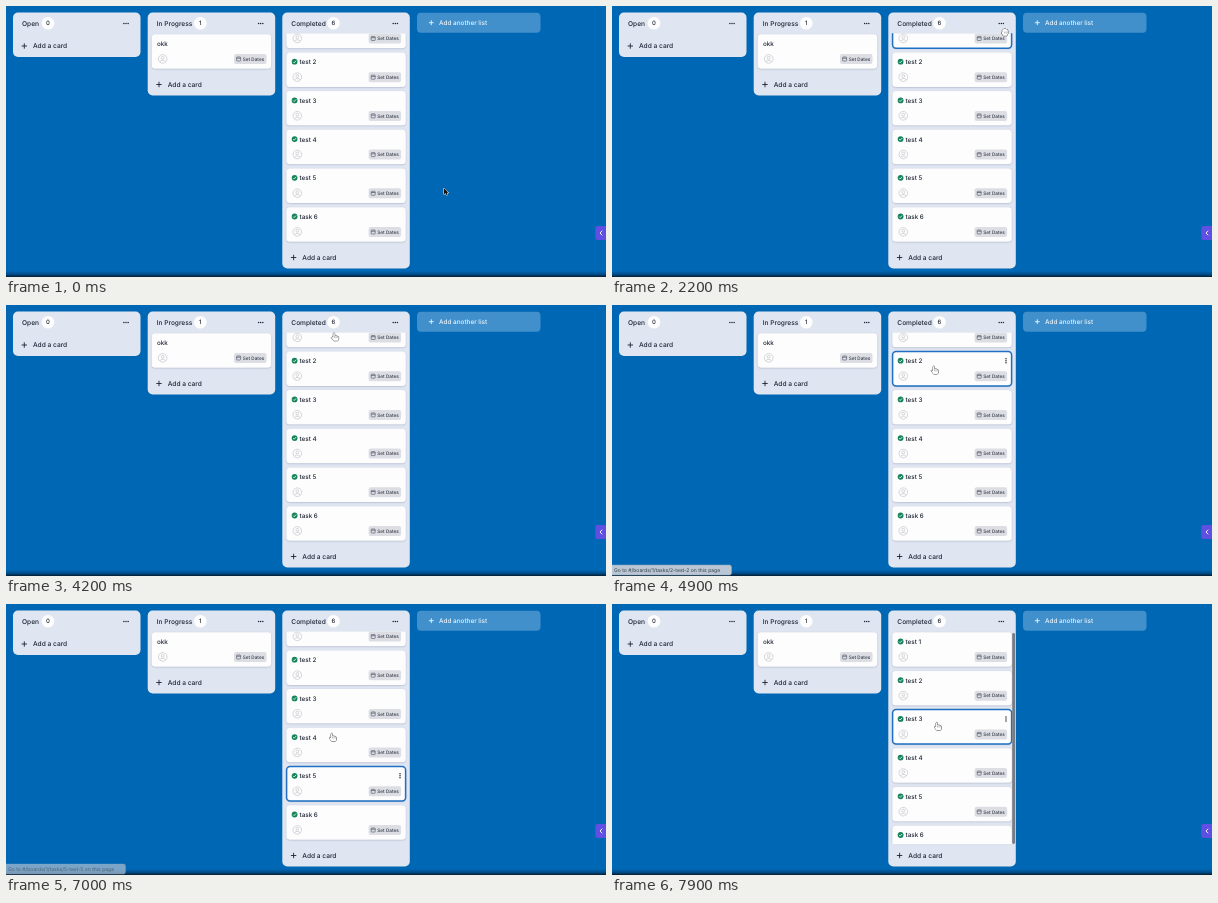
Write an HTML page with a canvas that moves like this. It is 600x271 px and loops after 8 s.

```html
<!DOCTYPE html>
<html>
<head>
<meta charset="utf-8">
<style>
  html, body { margin: 0; height: 100%; overflow: hidden; background: #0067b4; }
  canvas { display: block; width: 600px; height: 271px; }
</style>
</head>
<body>
<canvas></canvas>
<script>
const canvas = document.querySelector('canvas');
const ctx = canvas.getContext('2d');
const scale = window.devicePixelRatio || 1;
canvas.width = 600 * scale;
canvas.height = 271 * scale;

const LOOP = 8000, LAG = 200, MAX_SCROLL = 20.5;
const INK = '#1d2433', LIST = '#dfe5f1', WHITE = '#fdfdfd', ACCENT = '#1f70c4';
const tasks = ['test 1', 'test 2', 'test 3', 'test 4', 'test 5', 'task 6'];

// Pointer stops: time, x, y
const stops = [
  [0, 438, 182], [500, 438, 182], [1600, 402, 62], [2200, 393, 26], [2500, 389, 18],
  [3050, 389, 18], [3200, 340, 17], [3800, 333, 20], [4000, 331, 22], [4650, 323, 64],
  [5000, 323, 65], [5750, 330, 123], [5850, 330, 123], [6500, 328, 180], [6820, 328, 177],
  [7000, 327, 133], [7500, 326, 122], [8000, 326, 122]
];

const clamp = v => Math.max(0, Math.min(1, v));
const smooth = v => (v = clamp(v), v * v * (3 - 2 * v));

function pointerAt(t) {
  const i = Math.max(1, stops.findIndex(s => s[0] >= t));
  const [t0, x0, y0] = stops[i - 1], [t1, x1, y1] = stops[i];
  const p = smooth((t - t0) / (t1 - t0));
  return [x0 + (x1 - x0) * p, y0 + (y1 - y0) * p];
}

const scrollAt = t => MAX_SCROLL * (1 - smooth((t - 7500) / 380));
const cardTop = (i, scroll) => 28.2 + 38.7 * i - scroll;

function box(x, y, w, h, r, fill, stroke, width = 1) {
  ctx.beginPath();
  ctx.roundRect(x, y, w, h, r);
  if (fill) { ctx.fillStyle = fill; ctx.fill(); }
  if (stroke) { ctx.strokeStyle = stroke; ctx.lineWidth = width; ctx.stroke(); }
}

function circle(x, y, r, fill, stroke) {
  box(x - r, y - r, 2 * r, 2 * r, r, fill, stroke, 0.6);
}

function line(color, width, ...points) {
  ctx.beginPath();
  points.forEach(([x, y]) => ctx.lineTo(x, y));
  ctx.strokeStyle = color;
  ctx.lineWidth = width;
  ctx.stroke();
}

function text(s, x, y, size = 6.6, color = INK, weight = 500, align = 'left') {
  ctx.font = `${weight} ${size}px Inter, sans-serif`;
  ctx.textAlign = align;
  ctx.textBaseline = 'alphabetic';
  ctx.fillStyle = color;
  ctx.fillText(s, x, y + size * 0.36);
}

function plus(x, y, size, color) {
  line(color, 0.9, [x - size, y], [x + size, y]);
  line(color, 0.9, [x, y - size], [x, y + size]);
}

function dots(x, y, dx, dy) {
  for (let i = -1; i < 2; i++) circle(x + i * dx, y + i * dy, 0.75, INK);
}

function list(x, h, title, count, badgeX, highlight) {
  box(x, 6.5, 127.5, h, 5, LIST);
  text(title, x + 9, 17.3);
  circle(badgeX, 17.3, 6.3, WHITE);
  text(count, badgeX, 17.3, 6, INK, 500, 'center');
  if (highlight) box(x + 106.5, 11, 13.5, 13, 2.5, '#ccd1dc');
  dots(x + 113, 17.6, 2.1, 0);
  const y = h - 4.5;
  plus(x + 11.3, y, 2.7, INK);
  text('Add a card', x + 20, y);
}

function card(x, y, title, done, hovered) {
  ctx.shadowColor = 'rgba(40,60,100,.3)';
  ctx.shadowBlur = 1.5 * scale;
  ctx.shadowOffsetY = 0.5 * scale;
  box(x, y, 119.5, 34.5, 3.5, WHITE);
  ctx.shadowColor = 'transparent';
  if (hovered) {
    box(x + 0.3, y, 119, 34.5, 3.5, null, ACCENT, 1.5);
    dots(x + 113.7, y + 9.3, 0, 2);
  }
  if (done) {
    circle(x + 8.3, y + 9.3, 2.9, '#16845b');
    line('#fff', 0.8, [x + 6.9, y + 9.4], [x + 7.9, y + 10.4], [x + 9.8, y + 8.3]);
  }
  text(title, x + (done ? 13.2 : 5.2), y + 9.5, 6.3);

  const ax = x + 11, ay = y + 24.7;
  circle(ax, ay, 4.3, null, '#b9bcc3');
  circle(ax, ay - 1.1, 1.4, null, '#b9bcc3');
  line('#b9bcc3', 0.6, [ax - 2.7, ay + 3], [ax - 1.5, ay + 1.5], [ax + 1.5, ay + 1.5], [ax + 2.7, ay + 3]);

  box(x + 82.3, y + 19.8, 32.5, 10, 2, '#dcdee4');
  box(x + 84.9, y + 22.8, 4, 4, 0.6, null, '#4a5060', 0.6);
  line('#4a5060', 0.7, [x + 84.9, y + 24], [x + 88.9, y + 24]);
  text('Set Dates', x + 91, y + 24.9, 4.7, '#343a48');
}

function status(label, alpha) {
  ctx.globalAlpha = alpha;
  box(-2, 260, 121.5, 10, 2, '#bac6d3', '#8fa6bd', 0.5);
  text(`Go to #/boards/1/tasks/${label} on this page`, 2, 264.8, 5.05, '#35404c', 400);
  ctx.globalAlpha = 1;
}

const arrow = new Path2D('M0 0V6.4L1.5 5.1L2.5 7.2L3.6 6.7L2.7 4.7H4.6Z');
const finger = new Path2D('M-1.9 1V-3.2Q-1.2-4.4-.5-3.2V-.7Q.3-1.4.9-.5Q1.7-1 2.2-.2Q3.3-.5 3.4.6V2Q3.2 3.2 2.5 4.2H-1.4Q-2.5 2.7-3.8 1Q-3.5-.3-1.9 1Z');
const grab = new Path2D('M-2.6-.1Q-3.3-2.5-1.7-2.4Q-1.2-3.7-.2-2.9Q.9-3.7 1.4-2.5Q3-2.7 2.9-.8Q3.3 1.8 1.9 3.8H-1.7Q-2.6 2.4-3.5 1.1Q-3.6 0-2.6-.1Z');

function pointer(x, y) {
  const overList = x < 404;
  const shape = !overList ? arrow : y < 28 ? grab : finger;
  ctx.save();
  ctx.translate(x, y);
  ctx.lineJoin = 'round';
  ctx.lineWidth = overList ? 0.9 : 1;
  ctx.strokeStyle = overList ? '#25282e' : '#fff';
  ctx.fillStyle = overList ? '#fff' : '#111';
  ctx.stroke(shape);
  ctx.fill(shape);
  if (overList) [-0.5, 0.9, 2.1].forEach(k => line('#666', 0.4, [k, -0.5], [k, 1.5]));
  ctx.restore();
}

function draw(t) {
  const scroll = scrollAt(t);
  const [hx, hy] = pointerAt(Math.max(0, t - LAG));
  const overDots = hx > 382 && hx < 395 && hy < 24;
  const hovered = tasks.findIndex((_, i) => {
    const d = hy - cardTop(i, scroll);
    return hx > 280 && hx < 400 && hy > 28 && d >= 0 && d <= 36;
  });

  ctx.setTransform(scale, 0, 0, scale, 0, 0);
  ctx.textRendering = 'geometricPrecision';
  ctx.fillStyle = '#0067b4';
  ctx.fillRect(0, 0, 600, 271);
  const shade = ctx.createLinearGradient(0, 265, 0, 270);
  shade.addColorStop(0, 'rgba(0,45,85,0)');
  shade.addColorStop(1, 'rgba(0,35,65,.65)');
  ctx.fillStyle = shade;
  ctx.fillRect(0, 265, 600, 5);
  ctx.fillStyle = '#06263f';
  ctx.fillRect(0, 269.7, 600, 2);

  list(7, 44.5, 'Open', '0', 42);
  list(141.7, 83, 'In Progress', '1', 194.3);
  card(145.7, 28.2, 'okk', false, false);
  list(276.3, 256, 'Completed', '6', 327.5, overDots);

  ctx.save();
  ctx.beginPath();
  ctx.rect(277, 27.3, 126.5, 213);
  ctx.clip();
  tasks.forEach((name, i) => card(280.3, cardTop(i, scroll), name, true, i === hovered));
  if (t >= 7550) box(400.2, 29 + scroll * 0.9, 2.8, 211 - scroll * 0.9, 1.4, '#777b82');
  ctx.restore();

  box(411, 6.7, 123.5, 20, 4, '#4190cb');
  plus(425.3, 16.7, 2.4, '#eef5fb');
  text('Add another list', 433, 16.7, 6.4, '#eef5fb');

  box(589.3, 220, 14, 14, 2, '#5f4fe3');
  line('#fff', 0.9, [596.2, 224.7], [594, 227], [596.2, 229.3]);

  const shown = t < 5900 ? [4500, 5750] : [6050, 7100];
  const alpha = clamp((t - shown[0]) / 150) * clamp((shown[1] - t) / 150);
  if (alpha && hovered >= 0) status(`${hovered + 1}-${tasks[hovered].replace(' ', '-')}`, alpha);

  pointer(...pointerAt(t));
}

function frame() {
  draw(performance.now() % LOOP);
  requestAnimationFrame(frame);
}
frame();
</script>
</body>
</html>
```
